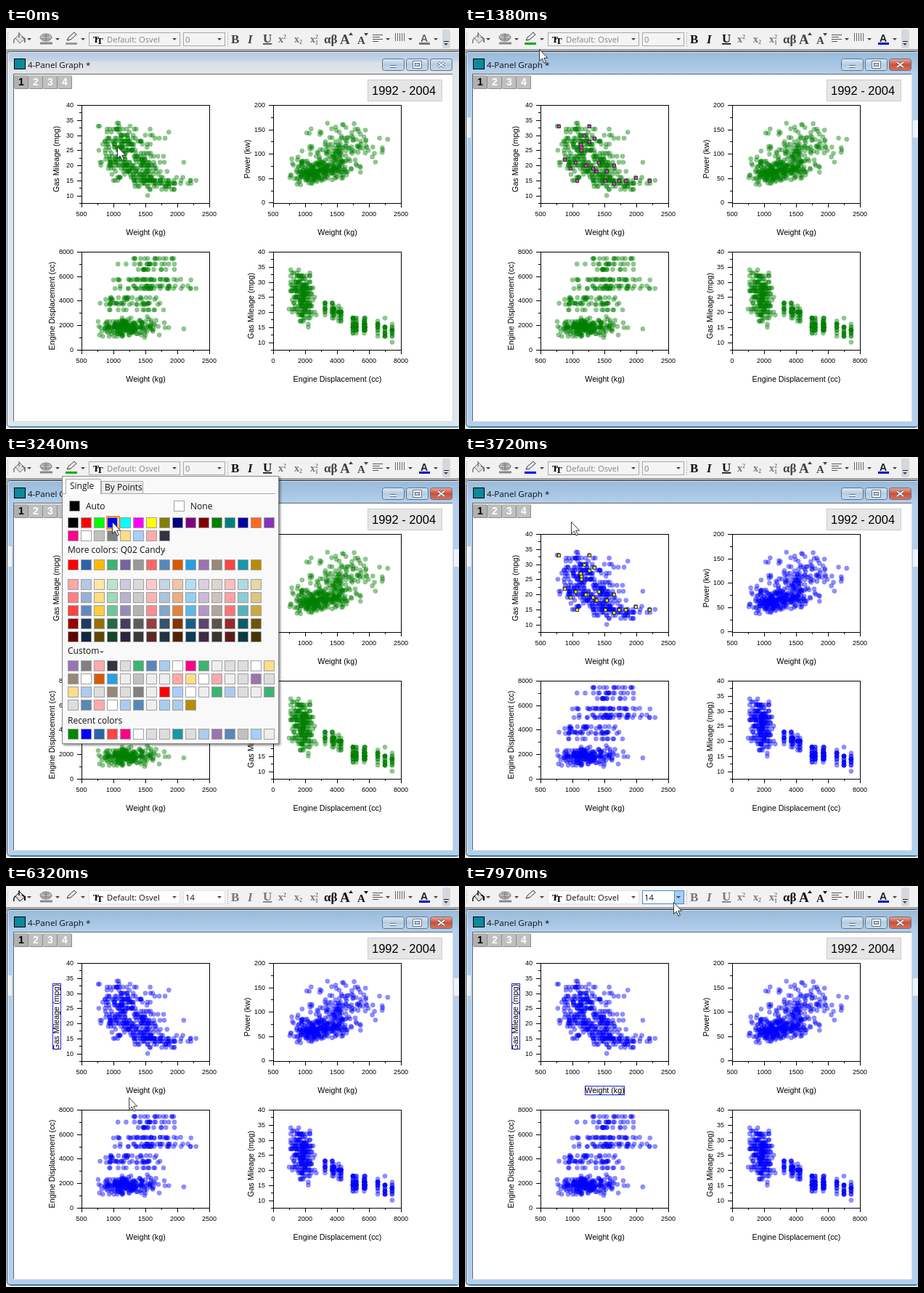
Recreate the animation shown at these times as an HTML page. Size 624 by 552 pixels, loop 8000 ms.

```html
<!DOCTYPE html>
<html lang="en">
<head>
<meta charset="utf-8">
<title>Four panel graph</title>
<style>
html, body { margin: 0; width: 100%; height: 100%; overflow: hidden; background: #f0f0f0; }
svg { display: block; width: 624px; height: 552px; animation: state 8s step-end infinite; }
text { white-space: pre; }
.ui { font-family: "Open Sans", "Noto Sans", sans-serif; }
.plot { font: 10.7px "Liberation Sans", sans-serif; }
.num { font-size: 9px; }
.mid { text-anchor: middle; }
.end { text-anchor: end; }
.bold { font: bold 14px "Liberation Sans", sans-serif; }
.serif { font-family: "Liberation Serif", serif; font-weight: bold; }
.crisp { shape-rendering: crispEdges; }
.line { fill: none; stroke: #000; }
.pick { fill: none; stroke: #22d; }
.on { animation: 8s step-end infinite; opacity: 0; }
.idle { animation-name: idle; }
.early { animation-name: early; }
.late { animation-name: late; }
#popup { animation-name: popup; }
#marks { animation-name: marks; fill: var(--mark); stroke: #333; }
#penHover { animation-name: penHover; }
#sizeHover { animation-name: sizeHover; }
#weightBox { animation-name: weightBox; }
#auto { animation-name: auto; }
#oldPick { animation-name: oldPick; }
#newPick { animation-name: newPick; }
#dots { fill: var(--dot); fill-opacity: .44; stroke: var(--dot); stroke-opacity: .2; stroke-width: .8; }
#cursor { animation: cursor 8s linear infinite; }

@keyframes state {
  0% { --dot: #008000; --mark: #f3c; --font: #858585; --bold: #444; --greek: #444; --pen: #999; --ink: #777; --letter: #666; --fill: #777; --field: #f4f4f4; --edge: #a9a9a9; }
  6.625% { --pen: #0a0; --ink: #0000c8; --letter: #222; --bold: #111; }
  43.25% { --pen: #00f; }
  46.5% { --dot: #00f; --mark: #f4ee00; }
  69.875%, 100% { --dot: #00f; --mark: #f4ee00; --font: #111; --bold: #777; --greek: #111; --pen: #f4f4f4; --ink: #0000c8; --letter: #222; --fill: #111; --field: #fff; --edge: #e2e2e2; }
}
@keyframes idle { 0%, 23.25% { opacity: 1 } 6.25%, 40.5%, 100% { opacity: 0 } }
@keyframes popup { 0%, 43.25%, 100% { opacity: 0 } 23.625% { opacity: 1 } }
@keyframes marks { 0%, 69.875%, 100% { opacity: 0 } 7% { opacity: 1 } }
@keyframes penHover { 0%, 23.25%, 100% { opacity: 0 } 18.375% { opacity: 1 } }
@keyframes sizeHover { 0% { opacity: 0 } 98.5%, 100% { opacity: 1 } }
@keyframes early { 0% { opacity: 1 } 69.875%, 100% { opacity: 0 } }
@keyframes late { 0% { opacity: 0 } 69.875%, 100% { opacity: 1 } }
@keyframes weightBox { 0% { opacity: 0 } 87%, 100% { opacity: 1 } }
@keyframes auto { 0%, 32.5%, 100% { opacity: 0 } 30.75% { opacity: 1 } }
@keyframes oldPick { 0% { opacity: 1 } 38.5%, 100% { opacity: 0 } }
@keyframes newPick { 0% { opacity: 0 } 38.5%, 100% { opacity: 1 } }
@keyframes cursor {
  0%, 11.7% { transform: translate(153px, 163px) }
  17.25% { transform: translate(102px, 29px) }
  19.5%, 29.6% { transform: translate(105px, 21px) }
  31.4% { transform: translate(129px, 75px) }
  36%, 52.4% { transform: translate(146px, 89px) }
  61.75%, 63.5% { transform: translate(63px, 148px) }
  64.5%, 75% { transform: translate(66px, 148px) }
  75.9% { transform: translate(58px, 146px) }
  79% { transform: translate(169px, 291px) }
  80.5%, 83.5% { transform: translate(183px, 279px) }
  84.5%, 90% { transform: translate(184px, 274px) }
  91.2% { transform: translate(176px, 258px) }
  94% { transform: translate(202px, 164px) }
  99.5%, 100% { transform: translate(287px, 22px) }
}
</style>
</head>
<body>
<svg viewBox="0 0 624 552">
  <defs>
    <linearGradient id="live" x2="0" y2="1"><stop stop-color="#98bad9"/><stop offset="1" stop-color="#b3cfec"/></linearGradient>
    <linearGradient id="dull" x2="0" y2="1"><stop stop-color="#b4cae4"/><stop offset=".35" stop-color="#c3d3e6"/><stop offset=".5" stop-color="#dcdfe3"/><stop offset="1" stop-color="#e2e5e9"/></linearGradient>
    <linearGradient id="btn" x2="0" y2="1"><stop stop-color="#dbe8f6"/><stop offset=".5" stop-color="#b4cce4"/><stop offset="1" stop-color="#c8dcf0"/></linearGradient>
    <linearGradient id="red" x2="0" y2="1"><stop stop-color="#eba899"/><stop offset=".5" stop-color="#cf4f38"/><stop offset="1" stop-color="#d9745f"/></linearGradient>
    <filter id="shade" x="-5%" y="-5%" width="112%" height="112%"><feDropShadow dx="2" dy="2" stdDeviation="1.5" flood-opacity=".45"/></filter>
  </defs>
  <rect width="624" height="552" fill="#f0f0f0"/>

  <!-- window -->
  <rect y="29" width="624" height="6" fill="#a6a4a4"/>
  <rect x="1.5" y="32.5" width="624" height="517" rx="5" fill="#b3cfec" stroke="#2c3b4a"/>
  <rect x="2" y="33" width="622" height="30" rx="4" fill="url(#live)"/>
  <path d="M2 123H8V151H2ZM617 127H624V151H617Z" fill="#edf3fa"/>
  <g class="on idle">
    <rect x="1.5" y="32.5" width="624" height="517" rx="5" fill="#dde5ee" stroke="#536170"/>
    <rect x="2" y="33" width="622" height="30" rx="4" fill="url(#dull)"/>
  </g>
  <path d="M2.5 546V37Q2.5 33.5 6 33.5H624" fill="none" stroke="#f0f7ff" opacity=".8"/>
  <path d="M2 548.5H624" stroke="#4cb4d4"/>
  <g id="buttons"></g>
  <g id="idleClose" class="on idle"></g>
  <rect class="crisp" x="11.5" y="42.5" width="15" height="14" fill="#0a8a9a" stroke="#000"/>
  <text class="ui" x="30" y="55" font-size="11.6" fill="#111">4-Panel Graph *</text>
  <rect x="10" y="63" width="606" height="479" fill="#fff"/>
  <path class="crisp" d="M10.5 541V63.5H615" fill="none" stroke="#666"/>
  <path class="crisp" d="M615.5 63V541.5H10" fill="none" stroke="#ddd"/>
  <g id="tabs" class="bold mid"></g>
  <rect class="crisp" x="498.5" y="71.5" width="102" height="29" fill="#e6e6e6" stroke="#ccc"/>
  <text x="504" y="92" style="font:16.5px 'Liberation Sans',sans-serif">1992 - 2004</text>

  <!-- graph -->
  <g id="axes" class="plot"></g>
  <g id="dots"></g>
  <g id="marks" class="on crisp"></g>
  <rect class="on late crisp pick" x="64.5" y="134.5" width="11" height="90"/>
  <rect id="weightBox" class="on crisp pick" x="165.5" y="275.5" width="54" height="12"/>

  <!-- toolbar -->
  <rect width="624" height="29" fill="#f1f1f1"/>
  <path d="M2.5 6V26M305.5 6V26" stroke="#999" stroke-dasharray="1 2"/>
  <rect id="penHover" class="on crisp" x="77.5" y="4.5" width="34" height="21" fill="#cfe5fa" stroke="#78aee0"/>
  <g stroke="var(--fill)" fill="none">
    <path d="M13 14L19 8L26 15L19 21Z" fill="#ddd"/>
    <path d="M18 13V6M13 14Q10 16 11 21" stroke-width="1.5"/>
    <path d="M22 12L26 15V20" stroke-width="2"/>
  </g>
  <g stroke="#777" fill="#bbb"><ellipse cx="55" cy="13" rx="8" ry="5"/><path d="M49 15H61M51 11H59M55 8V18"/></g>
  <path d="M47 21H64" stroke="#888" stroke-width="3"/>
  <path d="M84 17L86 13L94 6L97 9L89 16Z" fill="#eee" stroke="#333"/>
  <path d="M82 21.5H98" stroke="var(--pen)" stroke-width="3"/>
  <g class="crisp" fill="var(--field)" stroke="var(--edge)">
    <rect x="114.5" y="6.5" width="125" height="18"/><rect x="244.5" y="6.5" width="57" height="18"/>
  </g>
  <g id="sizeHover" class="on crisp" stroke="#3c8ad8">
    <rect x="244.5" y="6.5" width="57" height="18" fill="#fff"/>
    <rect x="288.5" y="6.5" width="13" height="18" fill="#a6cdf2"/>
  </g>
  <g class="serif"><text x="120" y="20" font-size="12">T</text><text x="125" y="22" font-size="13">T</text></g>
  <g class="ui" font-size="11.2" fill="var(--font)">
    <text x="139" y="20">Default: Osvel</text>
    <text class="on early" x="247" y="20">0</text>
    <text class="on late" x="247" y="20">14</text>
  </g>
  <g class="serif" font-size="17" fill="var(--bold)">
    <text x="310" y="21">B</text><text x="333" y="21" font-style="italic">I</text>
    <text x="354" y="20" text-decoration="underline">U</text>
  </g>
  <g class="serif" font-size="14" fill="#777">
    <text x="375" y="20">x<tspan dy="-5" font-size="8">2</tspan></text>
    <text x="397" y="20">x<tspan dy="2" font-size="8">2</tspan></text>
    <text x="419" y="20">x<tspan dy="-5" font-size="8">2</tspan><tspan dx="-4" dy="8" font-size="8">1</tspan></text>
  </g>
  <g class="serif" font-size="17" fill="var(--greek)">
    <text x="438" y="21">αβ</text><text x="460" y="22" font-size="19">A</text><text x="484" y="22" font-size="15">A</text>
    <path d="M472 10L475 6L478 10ZM493 7H499L496 11Z"/>
  </g>
  <text class="bold" x="571" y="19" fill="var(--letter)">A</text>
  <rect x="569" y="20" width="15" height="3" fill="var(--ink)"/>
  <path class="crisp" d="M505 9.5H519M505 12.5H515M505 15.5H519M505 18.5H513" stroke="#555"/>
  <path class="crisp" d="M536 10H549M536 15H549" stroke="#666" stroke-width="6" stroke-dasharray="1 2"/>
  <rect x="601" y="2" width="11" height="26" rx="3" fill="#d4d8de"/>
  <path d="M603 18.5H610" stroke="#222"/>
  <g id="arrows"></g>

  <!-- colour chooser -->
  <g id="popup" class="on">
    <rect x="77.5" y="26.5" width="298" height="368" fill="#f9f9f9" stroke="#8a8a8a" filter="url(#shade)"/>
    <path class="crisp" d="M78 50.5H82.5V30.5H130.5V50.5H371" fill="#fff" stroke="#aaa"/>
    <rect class="crisp" x="131.5" y="33.5" width="57" height="17" fill="#ececec" stroke="#aaa"/>
    <rect id="auto" class="on crisp" x="83.5" y="57.5" width="144" height="21" fill="#f2f5b0" stroke="#1a1a66"/>
    <g class="ui" font-size="12" fill="#111">
      <text x="88" y="44">Single</text><text x="136" y="46">By Points</text>
      <text x="110" y="72">Auto</text><text x="254" y="72">None</text>
      <text x="85" y="132">More colors: Q02 Candy</text>
      <text x="85" y="271">Custom</text><text x="85" y="367">Recent colors</text>
    </g>
    <g id="swatches" class="crisp" stroke="#a0a0a0"></g>
    <g class="crisp" fill="none" stroke="#e8962c" stroke-width="2">
      <rect id="oldPick" class="on" x="282" y="82" width="17" height="17"/>
      <rect id="newPick" class="on" x="139" y="82" width="17" height="17"/>
    </g>
  </g>

  <path id="cursor" d="M.5 .5V16.5L4.2 13L7 19.2L9.4 18.2L6.7 12.2H11.6Z" fill="#fff" stroke="#222" stroke-width=".9"/>
</svg>
<script>
const put = (id, html) => document.getElementById(id).innerHTML = html;
const list = (n, f) => Array.from({ length: n }, (_, i) => f(i));
const each = (n, f) => list(n, f).join('');

let seed = 20041;
const rnd = () => (seed = seed * 16807 % 2147483647) / 2147483647;
const bell = () => rnd() + rnd() - 1;
const oneOf = a => a[Math.floor(rnd() * a.length)];

// toolbar arrows, window buttons, page tabs
const arrow = (x, y = 14) => `<path d="M${x - 3} ${y}H${x + 3}L${x} ${y + 3}Z" fill="#444"/>`;
put('arrows', [32, 71, 106, 232, 294, 526, 557, 592].map(x => arrow(x)).join('') + arrow(606, 21));

const button = (x, fill, glyph) =>
  `<rect x="${x}" y="42.5" width="30" height="16" rx="3" fill="url(#${fill})" stroke="#5f7388"/>
  <path d="${glyph}" fill="none" stroke="#456" stroke-width="3.4"/>
  <path d="${glyph}" fill="none" stroke="#fff" stroke-width="1.8"/>`;
const cross = 'M595 47L604 54M604 47L595 54';
put('buttons', button(518.5, 'btn', 'M529 53H538') + button(551.5, 'btn', 'M562 47h9v7h-9Z') + button(584.5, 'red', cross));
put('idleClose', button(584.5, 'btn', cross));

put('tabs', each(4, i => {
  const x = 11 + i * 20;
  return `<rect class="crisp" x="${x}" y="65" width="19" height="18" fill="${i ? '#c0c0c0' : '#b0b0b0'}"/>
    <path class="line crisp" d="M${x + .5} 83.5h19v-18" style="stroke:#8c8c8c"/>
    <text x="${x + 10}" y="79" fill="${i ? '#fff' : '#000'}">${i + 1}</text>`;
}));

// cars: engine class sets displacement, weight, mileage and power
function car() {
  const kind = rnd();
  if (kind < .53) {
    const disp = 100 * Math.round(18.5 + 8.5 * bell());
    const weight = 1130 + 420 * bell() + 650 * rnd() ** 5;
    const mpg = 25.5 + 9 * bell() - (disp - 1850) * .003 - (weight - 1130) * .004;
    return { disp, weight, mpg: Math.round(mpg), power: 62 + 24 * bell() + (weight - 1130) * .015 };
  }
  if (kind < .7) {
    const disp = oneOf([3250, 3700, 3800, 4100, 4250]);
    return {
      disp, weight: 1290 + 600 * bell(),
      mpg: Math.round(21.5 - (disp - 3250) / 500 + 3 * bell()), power: 82 + 36 * bell()
    };
  }
  const disp = [5000, 5200, 5700, 5750, 6550, 7000, 7450][Math.floor(7 * rnd() ** 1.35)];
  const weight = 1600 + (disp < 6000 ? 740 : 560) * bell();
  const mpg = 15.8 - (disp - 5000) / 1100 - (weight - 1600) * .002 + 3.5 * bell();
  return { disp, weight, mpg: Math.round(mpg), power: 116 + 48 * bell() };
}
const cars = list(410, car);

// each axis: title, first x label, label step, top y label, pixels per step on y
const axis = {
  weight: { title: 'Weight (kg)', first: 500, step: 500 },
  disp: { title: 'Engine Displacement (cc)', first: 0, step: 2000, top: 8000, gap: 33.7 },
  mpg: { title: 'Gas Mileage (mpg)', step: 5, top: 40, gap: 20.75 },
  power: { title: 'Power (kw)', step: 50, top: 200, gap: 33.6 }
};
const w = 176, h = 135, col = 44;

function panel(x, y, xKey, yKey, titleX) {
  const ax = axis[xKey], ay = axis[yKey], bottom = y + h;
  const rows = Math.floor(h / ay.gap) + 1;
  let frame = `M${x + .5} ${y + .5}h${w}v${h}h${-w}Z`;
  for (let i = 0; i < 9; i++) frame += `M${x + i * col / 2 + .5} ${bottom}v${i % 2 ? 3 : 6}`;
  for (let i = 0; i * ay.gap / 2 <= h; i++) frame += `M${x} ${Math.round(y + i * ay.gap / 2) + .5}h${i % 2 ? -3 : -6}`;
  return {
    axes: `<path class="line crisp" d="${frame}"/>` +
      each(5, i => `<text class="num mid" x="${x + i * col}" y="${bottom + 18}">${ax.first + i * ax.step}</text>`) +
      each(rows, i => `<text class="num end" x="${x - 11}" y="${y + i * ay.gap + 3}">${ay.top - i * ay.step}</text>`) +
      `<text class="mid" x="${x + w / 2 + .5}" y="${bottom + 44}">${ax.title}</text>
      <text class="mid" transform="translate(${titleX} ${y + h / 2 + 7}) rotate(-90)">${ay.title}</text>`,
    points: cars.map(c => [
      x + (c[xKey] - ax.first) / ax.step * col,
      y + (ay.top - c[yKey]) / ay.step * ay.gap
    ])
  };
}
const panels = [
  panel(104, 106, 'weight', 'mpg', 73), panel(368, 106, 'weight', 'power', 336),
  panel(104, 308, 'weight', 'disp', 67), panel(368, 308, 'disp', 'mpg', 341)
];
put('axes', panels.map(p => p.axes).join(''));
put('dots', panels.flatMap(p => p.points).map(([x, y]) =>
  `<circle cx="${x.toFixed(1)}" cy="${y.toFixed(1)}" r="3.1"/>`).join(''));
put('marks', panels[0].points.filter((_, i) => i % 16 === 0).map(([x, y]) =>
  `<rect x="${Math.round(x) - 1.5}" y="${Math.round(y) - 1.5}" width="4" height="4"/>`).join(''));

// colour chooser
const hex = s => s.split(' ').map(c => '#' + c);
const swatch = (x, y, c) => `<rect x="${x + .5}" y="${y + .5}" width="14" height="14" fill="${c}"/>`;
const row = (y, colors) => colors.map((c, i) => swatch(85 + i * 18, y, c)).join('');
const basic = hex('000 f00 0f0 00f 0ff f0f ff0 808000 000080 800080 800000 008000 008080 0000a0 ff6a1e 8434bc');
const soft = hex('f08 fff c0c0c0 808080 fd8 acf faa 334');
const candy = hex('f00 2c62ac fb0 3cb371 7464a0 999 f66 5888b8 d85a00 26a0e0 9a74b0 988878 f44 1898a8 b88c00');
const tint = (share, base) => candy.map(c => `color-mix(in srgb, ${c} ${share}%, ${base})`);
const pale = hex('eee ddd ace fff');
const mixed = n => list(n, () => oneOf(rnd() < .45 ? pale : [...candy, ...soft]));

put('swatches',
  swatch(87, 60, '#000') + swatch(231, 60, '#fff') +
  row(83, basic) + row(101, soft) + row(141, candy) +
  [35, 50, 75].map((share, i) => row(168 + i * 18, tint(share, '#fff'))).join('') +
  [60, 38].map((share, i) => row(222 + i * 18, tint(share, '#000'))).join('') +
  each(4, i => row(280 + i * 18, mixed(i < 3 ? 16 : 10))) +
  row(374, ['#080', '#00f', ...mixed(14)]) +
  arrow(217, 128) + arrow(132, 267));
</script>
</body>
</html>
```
